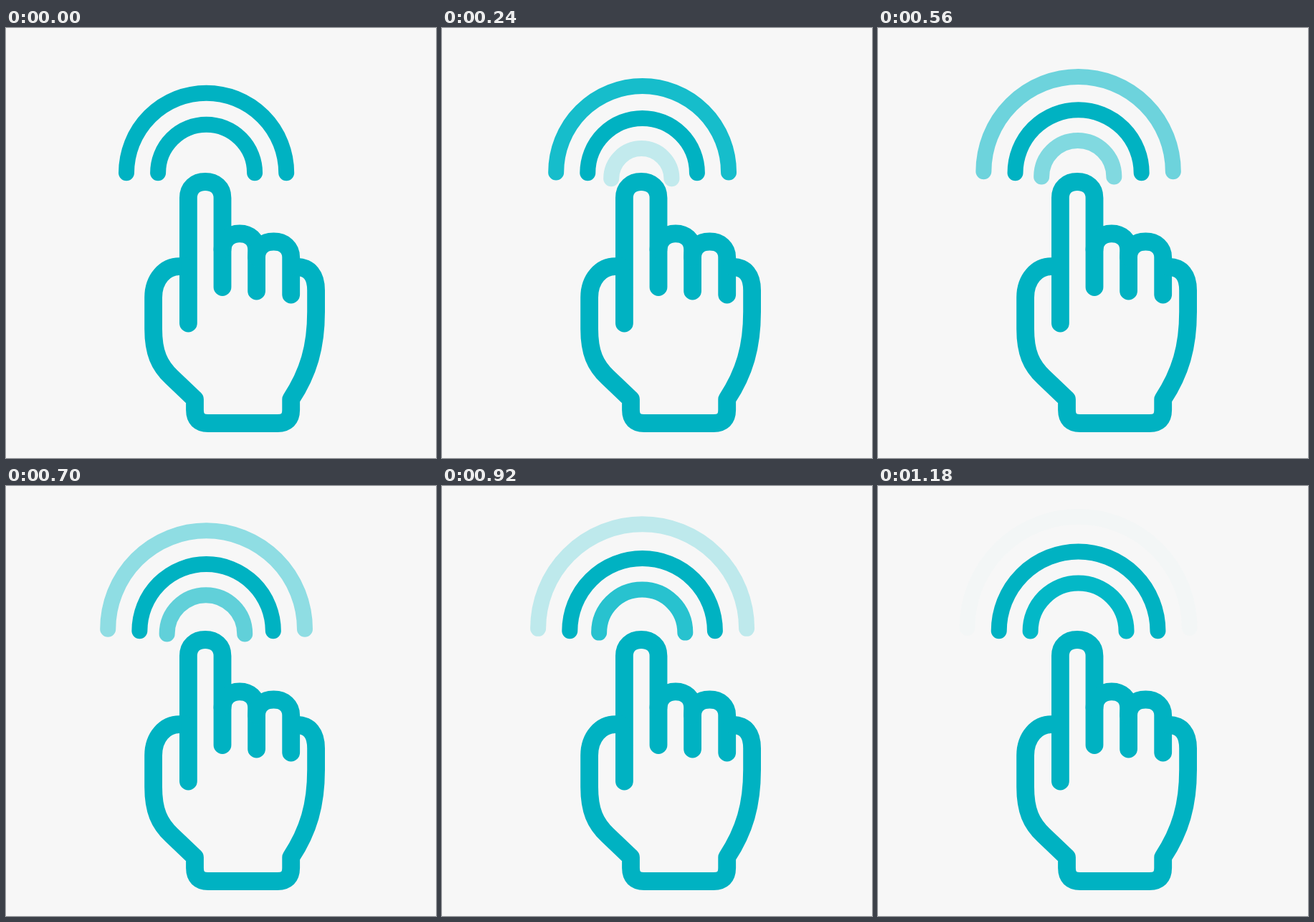
Animation of 600 by 600 pixels, one loop 1200 ms. Source, as an HTML page with a canvas:

```html
<!DOCTYPE html>
<html lang="en">
<head>
<meta charset="utf-8">
<title>Tap gesture</title>
<style>
  html, body { margin: 0; width: 100%; height: 100%; overflow: hidden; background: #f7f7f7; }
  canvas { display: block; width: 600px; height: 600px; }
</style>
</head>
<body>
<canvas id="stage" width="600" height="600"></canvas>
<script>
const ctx = document.getElementById('stage').getContext('2d');
const LOOP = 1200, STEP = 20;
const BACKGROUND = '#f7f7f7', TEAL = '#00b2c2', FADING = '#00b8c7';

const hand = [
  // index finger
  'M254.4 412V237C254.4 223 264 214.5 278 214.5S302 223 302 237V361.5',
  // folded fingers
  'M302 309C302 296 312 286.8 326 286.8S349.6 296 349.6 309V367',
  'M349.6 320C349.6 307 359 298 373.5 298S397.7 307 397.7 320V372',
  // palm and wrist
  'M250 332.7H242C222 332.7 205.6 350 205.6 376V420C205.6 453 214 471 231 487' +
  'L263.5 518V533Q263.5 551.5 282 551.5H379Q397.7 551.5 397.7 533V518' +
  'C422 481 432.6 445 432.6 396V366C432.6 346 424 333.5 405 333.5'
].map(d => new Path2D(d));

const lerp = (a, b, p) => a + (b - a) * p;

// Linear interpolation through [time, value] pairs.
function track(points, t) {
  const i = Math.max(1, points.findIndex(([time]) => time >= t));
  const [t0, v0] = points[i - 1], [t1, v1] = points[i];
  return lerp(v0, v1, (t - t0) / (t1 - t0));
}

const fadeOut = [[0, 1], [240, 0.91], [380, 0.72], [560, 0.555], [700, 0.425], [920, 0.23], [1200, 0]];
const fadeIn = [[0, 0], [240, 0.215], [380, 0.305], [560, 0.48], [700, 0.605], [920, 0.84], [1200, 1]];

function drawWave(x, y, radius, color, alpha) {
  ctx.globalAlpha = alpha;
  ctx.strokeStyle = color;
  ctx.lineWidth = 22;
  ctx.beginPath();
  ctx.arc(x, y, radius, Math.PI, 0);
  ctx.stroke();
  ctx.globalAlpha = 1;
}

function draw(t) {
  const p = t / LOOP;
  ctx.fillStyle = BACKGROUND;
  ctx.fillRect(0, 0, 600, 600);
  ctx.lineCap = ctx.lineJoin = 'round';

  drawWave(279.6, lerp(202.3, 197.8, p), lerp(111.6, 155.8, p), t ? FADING : TEAL, track(fadeOut, t));
  drawWave(lerp(278, 279.6, p), lerp(212.2, 202.3, p), lerp(35.8, 67.5, p), FADING, track(fadeIn, t));
  drawWave(279.6, 202.3, lerp(67.5, 111.6, p), TEAL, 1);

  ctx.strokeStyle = TEAL;
  ctx.lineWidth = 24.8;
  hand.forEach(path => ctx.stroke(path));
}

const start = performance.now();
function tick() {
  const t = (performance.now() - start) % LOOP;
  draw(Math.floor(t / STEP) * STEP);
  requestAnimationFrame(tick);
}
tick();
</script>
</body>
</html>
```
